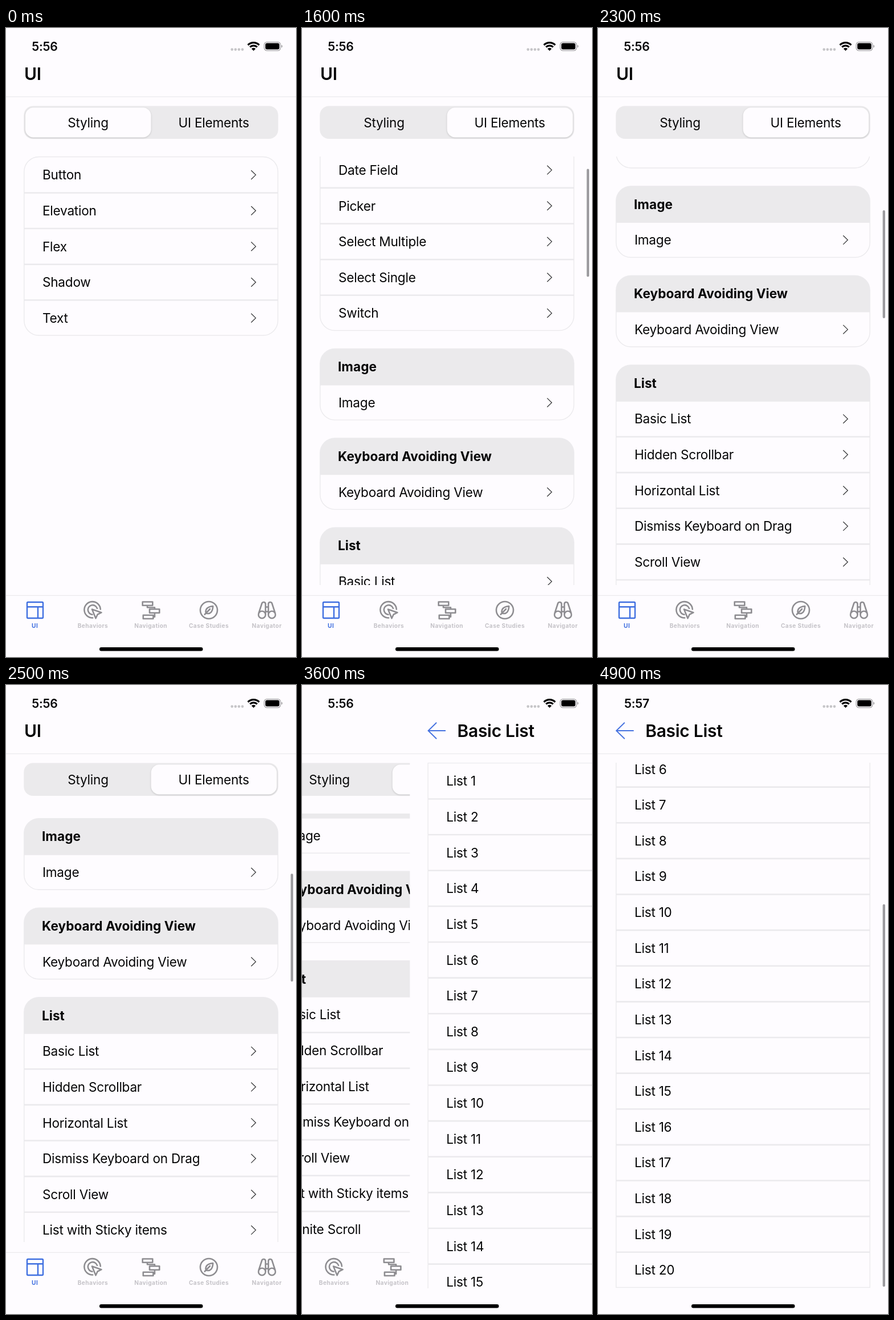
An HTML page for the animation above (5 s loop, 509 by 1101 pixels).

```html
<!DOCTYPE html>
<html lang="en">
<head>
<meta charset="utf-8">
<title>UI list demo</title>
<style>
  html, body { margin: 0; width: 100%; height: 100%; overflow: hidden; background: #fefcff; }
  svg { display: block; width: 100vw; height: 100vh; font-family: Inter, "Open Sans", sans-serif; }
  text { white-space: pre; fill: #060607; }
  .row { font-size: 22.6px; letter-spacing: -.011em; }
  .head { font-size: 22.6px; font-weight: 700; letter-spacing: .001em; }
  .title { font-size: 30px; letter-spacing: -.01em; font-weight: 600; }
  .clock { font-size: 21.2px; letter-spacing: -.01em; font-weight: 600; }
  .tab { font-size: 10.2px; letter-spacing: .4px; font-weight: 700; fill: #c5c3c8; }
  .tab.on { fill: #3f6fe0; }
  .mid { text-anchor: middle; }
  .icon { fill: none; stroke: #8e8d91; stroke-width: 2.6; stroke-linecap: round; stroke-linejoin: round; }
  .icon.on { stroke: #3f6fe0; stroke-width: 2.4; }
  .line { fill: none; stroke: #ebeaed; stroke-width: 1.4; }
  .rule { fill: none; stroke: #ebeaed; stroke-width: 2.6; }
  .chev { fill: none; stroke: #39393b; stroke-width: 1.3; }
  .pill { fill: #fefcff; filter: drop-shadow(0 1.5px 1.5px rgba(0, 0, 0, .17)); }
  .bar { fill: #9c9b9f; }
</style>
</head>
<body>
<svg id="stage" viewBox="0 0 509 1101" xmlns="http://www.w3.org/2000/svg"></svg>
<script>
const LOOP = 5000, STEP = 100, W = 509, ROW = 62.63, GAP = 31.3, LEFT = 31.8, CARD = 445.4;
const BG = '#fefcff', GREY = '#ebeaec';

// ---- markup helpers ----
const text = (x, y, s, cls) => `<text x="${x}" y="${y}" class="${cls}">${s}</text>`;
const path = (d, cls) => `<path d="${d}" class="${cls}"/>`;
const rect = (x, y, w, h, r, attrs) =>
  `<rect x="${x}" y="${y}" width="${w}" height="${h}" rx="${r}" ${attrs}/>`;
const clip = (id, y, h) => `<clipPath id="${id}">${rect(0, y, W, h, 0, '')}</clipPath>`;

function card(y, rows, { head, radius = 26, chevrons = true } = {}) {
  const all = head ? [head, ...rows] : rows;
  const top = y - .3, h = all.length * ROW - .6;
  let out = '';
  if (head) {
    out += `<path fill="${GREY}" d="M${LEFT} ${y + ROW + 1.2}V${top + radius}a${radius} ${radius} 0 0 1 ${radius} -${radius}` +
      `h${CARD - 2 * radius}a${radius} ${radius} 0 0 1 ${radius} ${radius}V${y + ROW + 1.2}z"/>`;
  }
  out += rect(LEFT, top, CARD, h, radius, 'class="line"');
  all.forEach((label, i) => {
    const cy = y + (i + .5) * ROW, isHead = head && i === 0;
    out += text(isHead ? 63 : 64, cy + 8.3, label, isHead ? 'head' : 'row');
    if (isHead) return;
    if (chevrons) out += path(`M430.3 ${cy - 7.8}l8 7.8l-8 7.8`, 'chev');
    if (i < all.length - 1) out += path(`M${LEFT} ${y + (i + 1) * ROW}h${CARD}`, 'rule');
  });
  return out;
}

function elements() {
  const groups = [
    ['Forms', ['Date Field', 'Picker', 'Select Multiple', 'Select Single', 'Switch']],
    ['Image', ['Image']],
    ['Keyboard Avoiding View', ['Keyboard Avoiding View']],
    ['List', ['Basic List', 'Hidden Scrollbar', 'Horizontal List', 'Dismiss Keyboard on Drag',
      'Scroll View', 'List with Sticky items', 'Infinite Scroll', '']]
  ];
  let y = 225.8, out = '';
  for (const [head, rows] of groups) {
    out += card(y, rows, { head });
    y += (rows.length + 1) * ROW + GAP;
  }
  return out;
}

function tabs() {
  const icons = [
    'M38.5 1005h25a1.5 1.5 0 0 1 1.5 1.5v25a1.5 1.5 0 0 1-1.5 1.5h-25a1.5 1.5 0 0 1-1.5-1.5v-25a1.5 1.5 0 0 1 1.5-1.5zM37 1013.3h28M56 1013.3v19.7',
    'M165.8 1017.5a14.2 14.2 0 1 0-13.6 15M160 1015.8a8.3 8.3 0 1 0-8.5 10.9M151 1017.5l16.5 5.7l-6.8 3.3l-3.2 6.8z',
    'M239.7 1004.5h17.6v6.3h-17.6zM252 1017.3h17.3v6.5h-17.3zM240.8 1027.8h17.6v6.2h-17.6zM248 1010.8v3.4h13v3M261 1023.8v7h-2.6',
    'M371 1019a15 15 0 1 1-30 0a15 15 0 1 1 30 0M348.8 1026.5l9.2-9.5M351 1024.5c-2-7 2.5-11.5 12.2-12.5c-.2 9.5-4.2 14.5-12.2 12.5z',
    'M455.5 1027a6.2 6.2 0 1 1-12.4 0a6.2 6.2 0 1 1 12.4 0M472.9 1027a6.2 6.2 0 1 1-12.4 0a6.2 6.2 0 1 1 12.4 0' +
    'M443.5 1024.5l5.7-17.5q.8-2 3-2q3.3 0 3.3 3.3v18.7M472.5 1024.5l-5.7-17.5q-.8-2-3-2q-3.3 0-3.3 3.3v18.7M455.5 1013.5h5M455.5 1021.5h5'
  ];
  return ['UI', 'Behaviors', 'Navigation', 'Case Studies', 'Navigator'].map((name, i) => {
    const on = i ? '' : ' on';
    return path(icons[i], 'icon' + on) + text(50.6 + i * 101.8, 1049.7, name, 'tab mid' + on);
  }).join('');
}

function statusBar() {
  const dots = [0, 1, 2, 3].map(i => `<circle cx="${396.7 + i * 6.1}" cy="37.6" r="2.3" fill="#c6c5c8"/>`).join('');
  const arc = r => {
    const d = r * Math.SQRT1_2;
    return `<path d="M${434.5 - d} ${39.7 - d}A${r} ${r} 0 0 1 ${434.5 + d} ${39.7 - d}" fill="none" stroke="#000" stroke-width="3.2"/>`;
  };
  return '<text id="clock" x="68" y="40" class="clock mid"></text>' + dots + arc(14) + arc(8.9) +
    '<path d="M434.5 39.9l-3.7-3.7a5.2 5.2 0 0 1 7.4 0z"/>' +
    rect(453.2, 24.6, 28.6, 15, 4.8, 'fill="none" stroke="#a3a2a5" stroke-width="1.3"') +
    rect(455.2, 26.6, 24.6, 11, 3, '') +
    '<path d="M483.4 29.6q1.9 .6 1.9 2.5t-1.9 2.5z" fill="#a3a2a5"/>';
}

const header = path(`M0 120.4H${W}`, 'line');
const names = Array.from({ length: 20 }, (_, i) => `List ${i + 1}`);
const stage = document.getElementById('stage');

stage.innerHTML = `
  <defs>${clip('homeClip', 225, 750)}${clip('listClip', 136, 920)}</defs>
  <g id="home">
    ${text(32, 91, 'UI', 'title')}${header}
    ${rect(31.3, 136.6, 446.4, 57.4, 16, `fill="${GREY}"`)}
    ${rect(33.9, 139.2, 220.7, 52.2, 14.5, 'id="pill" class="pill"')}
    ${text(144, 173.9, 'Styling', 'row mid')}${text(364.6, 173.9, 'UI Elements', 'row mid')}
    <g id="styling">${card(225.8, ['Button', 'Elevation', 'Flex', 'Shadow', 'Text'])}</g>
    <g id="elements" clip-path="url(#homeClip)"><g id="elementsBody">${elements()}</g></g>
    ${rect(499.7, 0, 4.3, 189, 2.1, 'id="homeBar" class="bar"')}
    ${path(`M0 993.4H${W}`, 'line')}${tabs()}
  </g>
  <g id="detail">
    ${rect(0, 0, W, 1101, 0, `fill="${BG}"`)}
    <path d="M46.8 65.8L32.2 80L46.8 94.2M32.2 80H62.7" fill="none" stroke="#4672e0" stroke-width="1.9"/>
    ${text(83.2, 91, 'Basic List', 'title')}${header}
    <g clip-path="url(#listClip)"><g id="listBody">${card(136.8, names, { radius: 0, chevrons: false })}</g></g>
    ${rect(499.7, 0, 4.3, 669.5, 2.1, 'id="listBar" class="bar"')}
  </g>
  ${statusBar()}
  ${rect(164, 1084, 181.5, 6.4, 3.2, '')}`;

// ---- motion ----
// Smooth monotone curve through [time, value] points, at rest on both ends.
function track(...p) {
  const rate = i => (p[i + 1][1] - p[i][1]) / (p[i + 1][0] - p[i][0]);
  const slope = p.map((_, i) => {
    if (!i || i === p.length - 1) return 0;
    const a = rate(i - 1), b = rate(i);
    return a * b > 0 ? 2 * a * b / (a + b) : 0;
  });
  return t => {
    if (t <= p[0][0]) return p[0][1];
    const i = p.findIndex(q => t < q[0]) - 1;
    if (i < 0) return p[p.length - 1][1];
    const d = p[i + 1][0] - p[i][0], u = (t - p[i][0]) / d, v = 1 - u;
    return p[i][1] * v * v * (1 + 2 * u) + p[i + 1][1] * u * u * (3 - 2 * u) +
      d * u * v * (slope[i] * v - slope[i + 1] * u);
  };
}

const pillMove = track([250, 0], [350, .3], [450, .7], [700, 1]);
const homeScroll = track([1400, 0], [1500, 20], [1800, 199], [2500, 399], [2950, 463]);
const homeBarFade = track([1420, 0], [1560, 1], [3050, 1], [3350, 0]);
const push = track([3400, 0], [3500, .24], [3600, .628], [3700, .86], [3800, .96], [4000, 1]);
const listScroll = track([4250, 0], [4400, 6], [4500, 70], [4700, 250], [4900, 334]);
const listBarFade = track([4250, 0], [4380, 1]);

const el = id => document.getElementById(id);
const move = (id, x, y) => el(id).setAttribute('transform', `translate(${x} ${y})`);
const show = (id, alpha) => el(id).setAttribute('opacity', alpha);

function draw(t) {
  const s = homeScroll(t), l = listScroll(t), k = push(t);
  move('pill', 220.7 * pillMove(t), 0);
  show('styling', t < 400 ? 1 : 0);
  show('elements', t < 400 ? 0 : 1);
  move('elementsBody', 0, -s);
  move('homeBar', 0, 228.4 + .255 * s);
  show('homeBar', homeBarFade(t));
  move('home', -.3 * W * k, 0);
  move('detail', W * (1 - k), 0);
  show('detail', k > 0 ? 1 : 0);
  move('listBody', 0, -l);
  move('listBar', 0, 140.6 + .728 * l);
  show('listBar', listBarFade(t));
  el('clock').textContent = t < 4000 ? '5:56' : '5:57';
}

const start = performance.now();
function tick() {
  const t = (performance.now() - start) % LOOP;
  draw(Math.floor(t / STEP) * STEP);
  requestAnimationFrame(tick);
}
tick();
</script>
</body>
</html>
```
